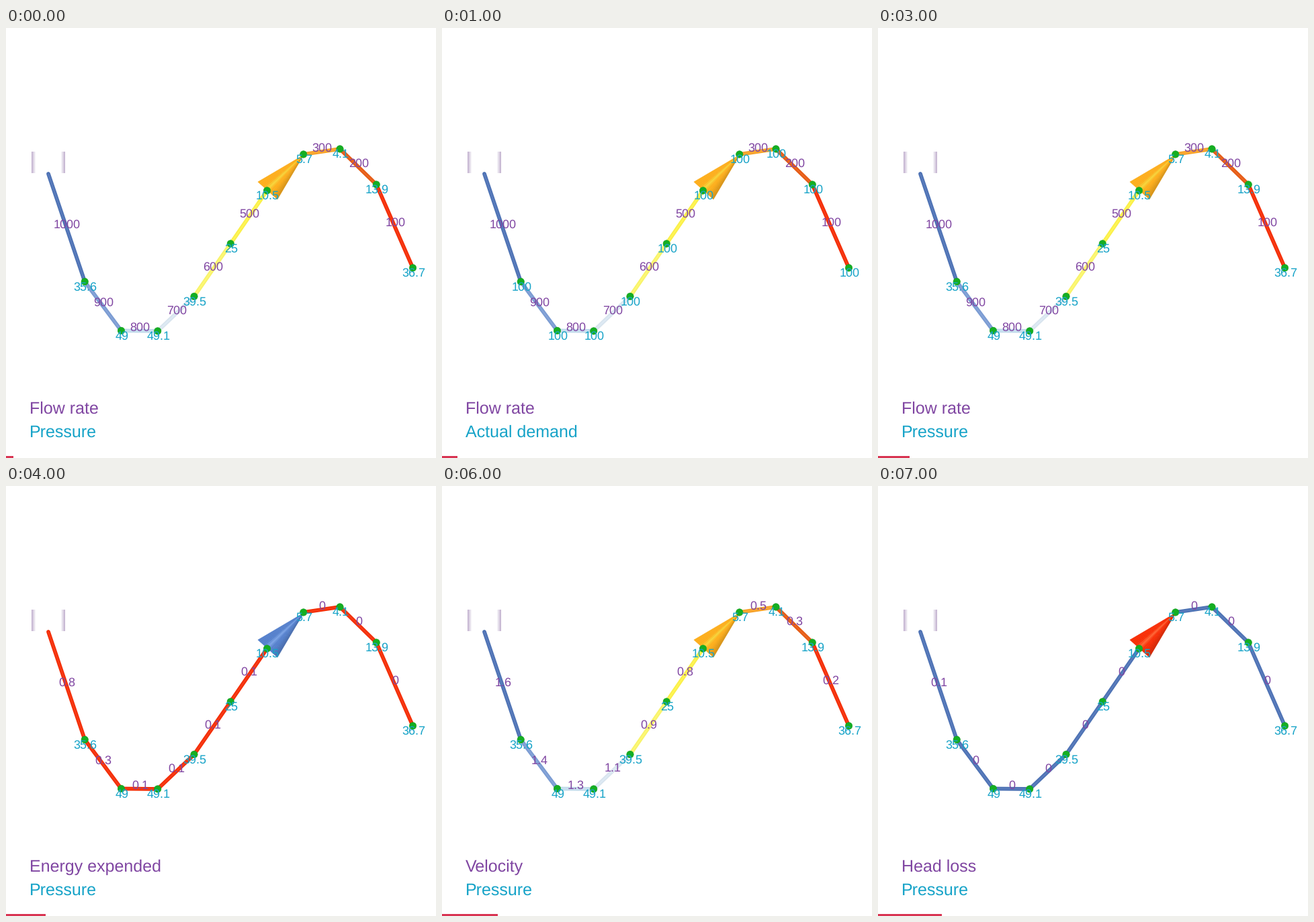
Animation, 640 px wide and 640 px high, one loop 8000 ms. Source, as a matplotlib script:

```python
import numpy as np
import matplotlib.pyplot as plt
from matplotlib.animation import FuncAnimation
from matplotlib.colors import to_rgb
from matplotlib.patches import Circle, Polygon, Rectangle

SIZE, DPI, STEP_MS = 640, 100, 1000
PX = 72 / DPI  # points per pixel
FONT = "Liberation Sans"
plt.rcParams["text.hinting"] = "none"  # keep natural letter spacing

PURPLE, CYAN, GREEN, CRIMSON = "#8046a2", "#16a3c8", "#14ae22", "#d83452"
RED, BLUE, ORANGE = "#f82e06", "#4f74b8", "#fdae1c"
CONE_BLUE = "#5580cc"
RAMP = [BLUE, "#7d9ed6", "#c6dff0", "#dce9f3", "#fdf86c", "#fff44a",
        ORANGE, "#fba428", "#ea5c14", RED]

XS = 63 + 54.25 * np.arange(11)
YS = np.array([217, 377.5, 450.5, 451, 399.5, 321, 242, 188, 180, 233, 357])
PUMP = 6  # link drawn as a cone

flow = [100 * k for k in range(10, 0, -1)]
area = np.pi * 0.9 ** 2 / 4
velocity = [q / 1000 / area for q in flow]
energy = [0.8, 0.3] + [0.1] * 4 + [0] * 4
head_loss = [0.1] + [0] * 9

pressure = [35.6, 49, 49.1, 39.5, 25, 10.5, 5.7, 4.1, 13.9, 36.7]
demand = [100] * 10
head = [49.2] + [49.1] * 5 + [54.2] * 4

# (title, values, pipe colours, cone colour, cone highlight)
FLOW = ("Flow rate", flow, RAMP, ORANGE, "#f6d83c")
ENERGY = ("Energy expended", energy, [RED] * 10, CONE_BLUE, "#7ea6e8")
ROUGH = ("Roughness", [120] * 10, [BLUE] * 10, RED, "#ff6a38")
SPEED = ("Velocity", velocity, RAMP, ORANGE, "#f6d83c")
LOSS = ("Head loss", head_loss, [BLUE] * 10, RED, "#ff6a38")

PRESSURE = ("Pressure", pressure)
DEMAND = ("Actual demand", demand)
HEAD = ("Head", head)

STEPS = [(FLOW, PRESSURE), (FLOW, DEMAND), (FLOW, HEAD), (FLOW, PRESSURE),
         (ENERGY, PRESSURE), (ROUGH, PRESSURE), (SPEED, PRESSURE),
         (LOSS, PRESSURE)]


def mix(color, goal, amount):
    a, b = np.array(to_rgb(color)), np.array(to_rgb(goal))
    return tuple(a + (b - a) * amount)


def number(value):
    return f"{round(value, 1):g}"


fig = plt.figure(figsize=(SIZE / DPI, SIZE / DPI), dpi=DPI, facecolor="white")
ax = fig.add_axes([0, 0, 1, 1])
ax.set_xlim(0, SIZE)
ax.set_ylim(SIZE, 0)
ax.axis("off")


def label(x, y, color, size=18, ha="center"):
    return ax.text(x, y, "", color=color, fontsize=size * PX, family=FONT,
                   ha=ha, va="baseline", zorder=6)


def draw_tank():
    for k in range(7):
        shade = mix("#c4b4d0", "white", min(1, k / 6))
        for x in (38 + k, 87 - k):
            ax.add_patch(Rectangle((x, 184), 1, 32, color=shade, lw=0))


def make_pipe(i):
    ends = XS[i:i + 2], YS[i:i + 2]
    body, = ax.plot(*ends, lw=5.8 * PX, solid_capstyle="round", zorder=2)
    shine, = ax.plot(*ends, lw=2.2 * PX, solid_capstyle="butt", zorder=2.1)
    return body, shine


def make_cone(slices=14):
    a, b, tip = np.array([375, 229]), np.array([404, 255]), (443, 189)
    parts = []
    for k in range(slices):
        u, v = k / slices, (k + 1) / slices
        mid = (u + v) / 2
        light = 0.9 * np.exp(-((mid - 0.46) / 0.09) ** 2)
        dark = 0.16 * max(0, (mid - 0.7) / 0.3)
        part = Polygon([a + (b - a) * u, a + (b - a) * v, tip],
                       lw=0.4, zorder=3)
        ax.add_patch(part)
        parts.append((part, light, dark))
    return parts


draw_tank()
pipes = {i: make_pipe(i) for i in range(10) if i != PUMP}
cone = make_cone()
for x, y in zip(XS[1:], YS[1:]):
    ax.add_patch(Circle((x, y), 5.2, fc=GREEN, ec="#129f1e", lw=0.4, zorder=4))

link_labels = {i: label((XS[i] + XS[i + 1]) / 2 + 0.9,
                        (YS[i] + YS[i + 1]) / 2 + 0.2, PURPLE) for i in pipes}
node_labels = [label(x + 0.9, y + 13, CYAN)
               for x, y in zip(XS[1:], YS[1:])]
link_title = label(34.8, 573.5, PURPLE, 25, "left")
node_title = label(34.8, 609, CYAN, 25, "left")
bar = ax.add_patch(Rectangle((0, 637), 0, 3, color=CRIMSON, lw=0))


def update(step):
    (title, values, colors, base, glow), (node_name, node_values) = STEPS[step]
    link_title.set_text(title)
    node_title.set_text(node_name)
    for i, (body, shine) in pipes.items():
        body.set_color(mix(colors[i], "black", 0.02))
        shine.set_color(mix(colors[i], "white", 0.06))
        link_labels[i].set_text(number(values[i]))
    for text, value in zip(node_labels, node_values):
        text.set_text(number(value))
    for part, light, dark in cone:
        part.set_color(mix(mix(base, glow, light), "black", dark))
    bar.set_width(11 + 12 * step)
    return []


anim = FuncAnimation(fig, update, frames=len(STEPS), interval=STEP_MS,
                     init_func=lambda: update(0), repeat=True, repeat_delay=0)
plt.show()
```
